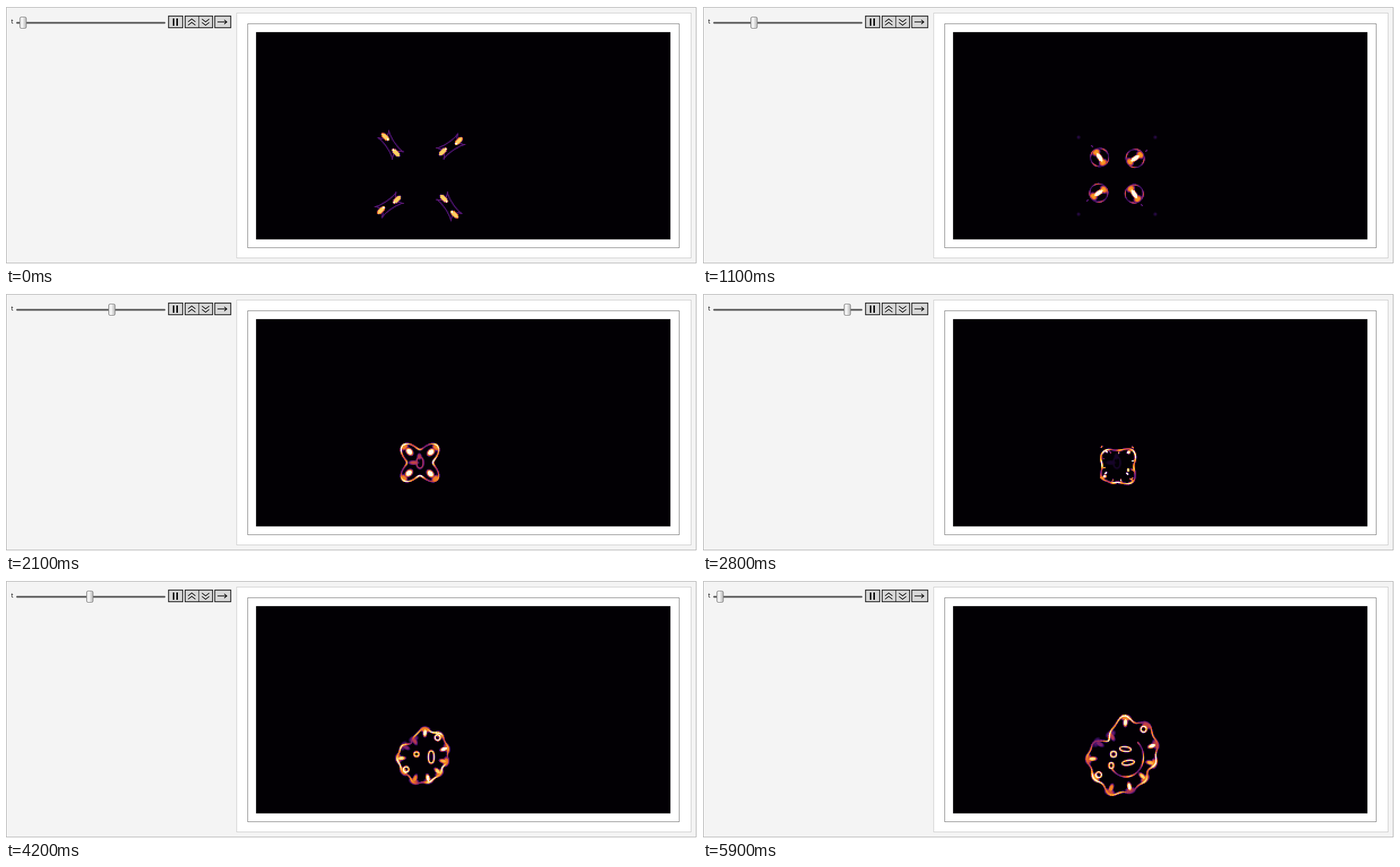
An HTML page with a canvas for the animation above (6 s loop, 1222x458 px).

```html
<!DOCTYPE html>
<html lang="en">
<head>
<meta charset="utf-8">
<title>Cellular collision</title>
<style>
html, body { margin: 0; width: 100%; height: 100%; overflow: hidden; background: #fff; }
svg { position: absolute; left: 0; top: 0; }
canvas { position: absolute; left: 640px; top: 210px; width: 190px; height: 182px; image-rendering: pixelated; }
text { font: 11px "Open Sans", "DejaVu Sans", sans-serif; }
</style>
</head>
<body>
<svg width="1222" height="458" viewBox="0 0 1222 458">
  <defs>
    <linearGradient id="knob">
      <stop offset="0" stop-color="#d0d0d0"/>
      <stop offset=".35" stop-color="#fafafa"/>
      <stop offset="1" stop-color="#b4b4b4"/>
    </linearGradient>
  </defs>
  <rect x=".5" y="2.5" width="1220" height="452" fill="#f4f4f4" stroke="#a9a9a9"/>
  <rect x="408" y="12.5" width="803.5" height="433" fill="#fff" stroke="#c6c6c6"/>
  <rect x="427.5" y="31.5" width="763" height="396" fill="#fff" stroke="#777"/>
  <rect x="442.2" y="46.2" width="732.8" height="366.5" fill="#020004"/>
  <text x="9" y="31">t</text>
  <rect x="18" y="28" width="264" height="3.4" rx="1.7" fill="#666"/>
  <g fill="#d8d8d8" stroke="#1a1a1a" stroke-width="1.6">
    <rect x="287.5" y="17.8" width="25" height="20.6"/>
    <rect x="316.8" y="17.8" width="48.6" height="20.6"/>
    <rect x="369.3" y="17.8" width="28.2" height="20.6"/>
    <path d="M341 18v20.4" stroke-width="1.2"/>
  </g>
  <path d="M295 22h2.7v13h-2.7zM301.3 22h2.7v13h-2.7z"/>
  <path d="M322 28l6.5-5 6.5 5M322 34l6.5-5 6.5 5M346.5 23l6.5 5 6.5-5M346.5 29l6.5 5 6.5-5M374 28.2h16M386 24.5l4.5 3.7-4.5 3.7" fill="none" stroke="#111" stroke-width="1.5"/>
  <rect id="thumb" x="24.5" y="19.5" width="11.5" height="20" rx="2.5" fill="url(#knob)" stroke="#777"/>
</svg>
<canvas id="cells" width="95" height="91"></canvas>
<script>
const cv = document.getElementById('cells');
const ctx = cv.getContext('2d', { willReadFrequently: true });
const thumb = document.getElementById('thumb');
const { PI, sin, cos, min, max, abs, exp, hypot } = Math;
const TAU = 2 * PI;
const mix = (a, b, p) => a + (b - a) * p;
const clamp = (v, lo = 0, hi = 1) => min(hi, max(lo, v));
const rad = d => d * PI / 180;
const bell = (x, width) => exp(-((x / width) ** 2));

// brightness -> colour
const STOPS = [[0, 2, 0, 4], [.15, 45, 10, 80], [.3, 98, 24, 118], [.45, 160, 45, 90],
  [.6, 222, 84, 50], [.75, 248, 146, 30], [.88, 254, 214, 105], [1, 255, 253, 240]];
const PALETTE = Array.from({ length: 256 }, (_, i) => {
  const v = i / 255, k = max(1, STOPS.findIndex(s => s[0] >= v));
  const a = STOPS[k - 1], b = STOPS[k], p = (v - a[0]) / (b[0] - a[0]);
  return [1, 2, 3].map(c => mix(a[c], b[c], p));
});

const gray = v => {
  const g = Math.round(clamp(v) * 255);
  return `rgb(${g},${g},${g})`;
};

function line(x1, y1, x2, y2, width, v) {
  ctx.strokeStyle = gray(v);
  ctx.lineWidth = width;
  ctx.beginPath();
  ctx.moveTo(x1, y1);
  ctx.lineTo(x2, y2);
  ctx.stroke();
}

function dot(x, y, rx, ry, angle, v) {
  if (min(rx, ry) < .3) return;
  ctx.save();
  ctx.translate(x, y);
  ctx.rotate(angle);
  ctx.scale(rx, ry);
  const g = ctx.createRadialGradient(0, 0, 0, 0, 0, 1);
  g.addColorStop(0, gray(v));
  g.addColorStop(.5, gray(v * .93));
  g.addColorStop(1, gray(0));
  ctx.fillStyle = g;
  ctx.beginPath();
  ctx.arc(0, 0, 1, 0, TAU);
  ctx.fill();
  ctx.restore();
}

function ring(x, y, rx, ry, angle, v) {
  if (min(rx, ry) < .3) return;
  ctx.strokeStyle = gray(v);
  ctx.lineWidth = 3;
  ctx.beginPath();
  ctx.ellipse(x, y, rx, ry, angle, 0, TAU);
  ctx.stroke();
}

// curve made of short strokes whose brightness follows the angle
function curve(point, bright, width, from = 0, to = TAU, keep = () => true) {
  const step = TAU / 100;
  for (let w = from; w < to - .001; w += step) {
    const p = point(w), v = bright(w);
    if (keep(p)) line(...p, ...point(w + step), width + v, v);
  }
}

// four-fold symmetry around the meeting point
function quarters(paint) {
  for (let q = 0; q < 4; q++) {
    ctx.save();
    ctx.translate(732, 300);
    ctx.rotate(q * PI / 2);
    paint(q);
    ctx.restore();
  }
}

const AXIS = rad(56);
const HEADING = rad(226.5);
const gap = n => 75.3 * exp(-.048 * n);

function drawPod(n, q) {
  const x = gap(n) * cos(HEADING), y = gap(n) * sin(HEADING);
  const place = (u, v) => [x + u * cos(AXIS) - v * sin(AXIS), y + u * sin(AXIS) + v * cos(AXIS)];
  const early = min(1, n / 11), late = clamp((n - 11) / 10);
  const form = early ** .6;

  // bone shape relaxing into a circle
  const shell = w => place(
    mix(24, 16, form) * cos(w) - mix(8, 0, form) * cos(3 * w),
    mix(12, 16, form) * sin(w) + mix(4, 0, form) * sin(3 * w));
  const glow = w => .3 + form * (.12 + .2 * sin(4 * w + q + n * .3)) + late * .25;
  curve(shell, glow, 1.2, 0, TAU, p => hypot(...p) > 22);

  for (const s of [-1, 1]) {
    dot(...place(s * 11, 0), 7, 9, AXIS, .78 * form * (s > 0 ? 1 - late : 1));
    const d = s * 17 * exp(-n / 6), h = mix(6.5, 3.5, early);
    const tilt = AXIS - rad(11) * (1 - early);
    const [bx, by] = place(d, 0), dx = h * cos(tilt), dy = h * sin(tilt);
    const v = mix(.87, 1, early);
    ctx.lineCap = 'butt';
    line(bx - dx * .9, by - dy * .9, bx + dx * .9, by + dy * .9, 8, v);
    ctx.lineCap = 'round';
    line(bx - dx, by - dy, bx + dx, by + dy, 5, v);
    dot(bx - s * dx, by - s * dy, 3.5, 3.5, 0, 1.1);
  }

  // faint remains left behind
  if (n > 0 && n < 14) {
    const fade = clamp((n - 7) / 5);
    const far = mix(-79, -65, fade), size = mix(4, .9, fade);
    ring(far, far, size, size, 0, mix(.25, .08, fade));
    dot(...place(-24, 0), 3, 1.8, AXIS, .32 * form);
  }
}

function drawCentre(v) {
  dot(721, 300, 11, 5, 0, .55 * v);
  dot(731, 289, 5, 7, 0, .5 * v);
  ring(732, 300, 6, 10, 0, .5 * v);
}

// lasting lobes and dents of the merged body: angle, height, width
const LOBES = [[30, -9, 25], [105, 7, 14], [230, -22, 22], [270, 9, 13], [310, 9, 20]];
// inner loops: x, y, rx, ry, degrees, first and last step
const LOOPS = [[732, 296, 1.5, 20, 3, 28, 41], [752, 313, 5, 11, 0, 27, 49], [752, 323, 11, 4, -9, 45, 70],
  [747, 299, 10, 4, 8, 45, 70], [726, 308, 5, 5, 0, 37, 70], [722, 328, 4, 5, 0, 46, 70]];
const KNOTS = 11;
const knotAngle = i => rad(176) - i * TAU / KNOTS;

function drawBody(n) {
  const grown = clamp((n - 26) / 30);
  const x = 732 + .28 * (n - 21), y = 300 + 12.5 * clamp((n - 21) / 13);
  const lobe = (a, deg, width) => {
    const off = a * 180 / PI - deg;
    return bell(off - 360 * Math.round(off / 360), width);
  };
  const radius = a => 33 + max(0, n - 30)
    - 10 * cos(4 * a) * clamp(1 - (n - 21) / 14)
    - 20 * lobe(a, 128, 18) * bell(n - 34, 5)
    + 2.5 * grown * cos(KNOTS * (a - knotAngle(0)))
    + grown * LOBES.reduce((sum, [deg, h, width]) => sum + h * lobe(a, deg, width), 0);
  const polar = (a, k = 1) => [x + k * radius(a) * cos(a), y + k * radius(a) * sin(a)];

  // the four bright cores dissolve while knots form along the rim
  const cores = clamp(1 - (n - 21) / 11), knots = clamp((n - 21) / 22);
  quarters(() => {
    dot(-18.5, -19.5, 10 * cores, 7 * cores, rad(48), 1.1);
    dot(-27, -28, 6 * cores, 9 * cores, rad(45), .72);
  });
  if (cores) drawCentre(bell(n - 21, 5));
  for (let i = 0; i < KNOTS; i++) {
    const a = knotAngle(i), dim = i < 9 ? 1 : .5;
    dot(...polar(a, .95), 7 * knots, 11 * knots, a, dim * (.62 + .13 * sin(i * 1.7)));
    if (i % 6 === 1) ring(...polar(a, .83), 5 * knots, 5 * knots, a, 1);
    else dot(...polar(a, .84), 10 * knots, 5 * knots, a, dim * (.95 + .2 * sin(i * 2.4)));
  }

  curve(polar, w => clamp(.78 + .2 * sin(3 * w + n * .12) + .2 * sin(8 * w - n * .2), .35), 1.9);

  for (const [lx, ly, rx, ry, deg, from, to] of LOOPS) {
    const k = clamp((n - from) / 6) * clamp((to - n) / 6);
    ring(lx, ly, rx * k, ry * k, rad(deg), .95);
  }

  // inner band closing around the loops
  const band = clamp((n - 52) / 6);
  const bow = w => [748 + 31 * cos(w), 313 + 35 * sin(w)];
  curve(bow, w => .62 + .25 * sin(5 * w + 1), 1.6, PI / 2 - 2.4 * band, PI / 2 + .9 * band);
}

function colourise() {
  const img = ctx.getImageData(0, 0, 95, 91), px = img.data;
  for (let i = 0; i < px.length; i += 4) {
    const c = PALETTE[px[i]];
    for (let k = 0; k < 3; k++) px[i + k] = c[k];
  }
  ctx.putImageData(img, 0, 0);
}

function draw(n) {
  const knobX = max(30, 268.7 - 9.65 * abs(n - 29.47));
  thumb.setAttribute('x', Math.round(knobX) - 5.5);

  ctx.setTransform(1, 0, 0, 1, 0, 0);
  ctx.globalCompositeOperation = 'source-over';
  ctx.fillStyle = '#000';
  ctx.fillRect(0, 0, 95, 91);
  ctx.setTransform(.5, 0, 0, .5, -320, -105);
  ctx.globalCompositeOperation = 'lighten';
  ctx.lineCap = 'round';
  if (n < 21) {
    quarters(q => drawPod(n, q));
    if (n > 15) drawCentre((n - 15) / 6);
  } else {
    drawBody(n);
  }
  colourise();
}

let shown = -1;
function tick() {
  const n = Math.floor(performance.now() % 6000 / 100);
  if (n !== shown) draw(shown = n);
  requestAnimationFrame(tick);
}
tick();
</script>
</body>
</html>
```
